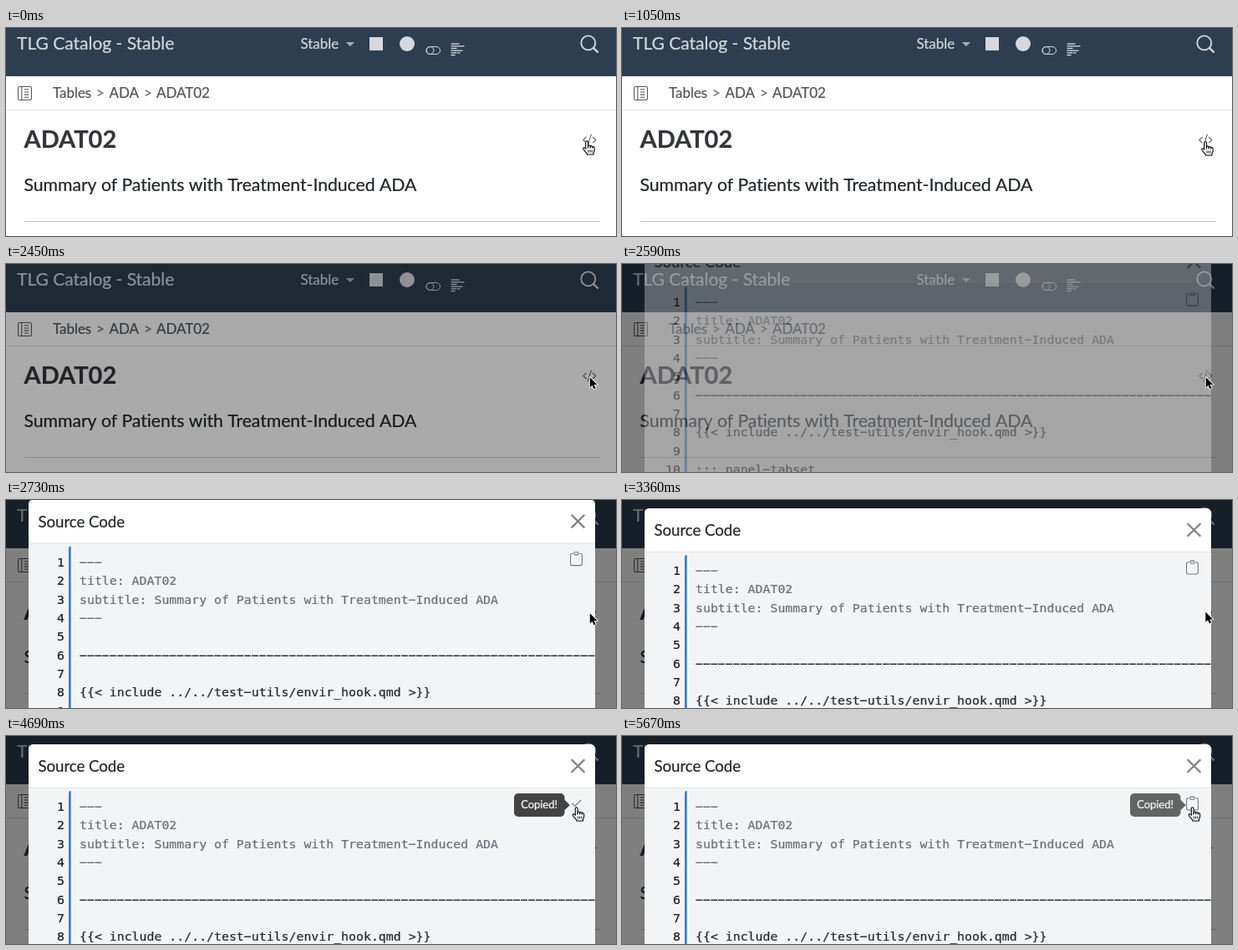
Recreate the animation shown at these times as an HTML page with a canvas. Size 730 by 250 pixels, loop 5740 ms.

```html
<!DOCTYPE html>
<html lang="en">
<head>
<meta charset="utf-8">
<title>Source code dialog</title>
<style>
  html, body { margin: 0; width: 100%; height: 100%; overflow: hidden; background: #fff; }
  canvas { display: block; width: 730px; height: 250px; }
</style>
</head>
<body>
<canvas id="stage"></canvas>
<script>
const W = 730, H = 250, LOOP = 5740, STEP = 70;
const SANS = 'Lato, sans-serif';
const MONO = '"DejaVu Sans Mono", monospace';
const NAV = '#d5d9dd';
const dpr = window.devicePixelRatio || 1;

function context(canvas) {
  canvas.width = W * dpr;
  canvas.height = H * dpr;
  return canvas.getContext('2d');
}

const stage = context(document.getElementById('stage'));
const layer = context(document.createElement('canvas'));
let ctx = stage;

const clamp = v => Math.max(0, Math.min(1, v));
const mix = (a, b, p) => a + (b - a) * p;
const ramp = (t, start, length) => clamp((t - start) / length);
const smooth = p => p * p * (3 - 2 * p);
const within = (t, a, b) => t >= a && t < b;

// CSS ease-out: cubic-bezier(0, 0, .58, 1)
function easeOut(p) {
  let lo = 0, hi = 1;
  for (let i = 0; i < 24; i++) {
    const u = (lo + hi) / 2;
    const x = 3 * (1 - u) * u * u * 0.58 + u * u * u;
    if (x < p) lo = u; else hi = u;
  }
  return 3 * (1 - lo) * lo * lo + lo * lo * lo;
}

// A hairline outline gives the slightly heavier look of smoothed type
function text(str, x, y, font, color, align = 'left') {
  ctx.font = font;
  ctx.letterSpacing = font.includes(SANS) ? '-0.05px' : '0px'; // also turns ligatures off
  ctx.textAlign = align;
  ctx.fillStyle = ctx.strokeStyle = color;
  ctx.lineWidth = 0.22;
  ctx.fillText(str, x, y);
  ctx.strokeText(str, x, y);
}

function box(x, y, w, h, color) {
  ctx.fillStyle = color;
  ctx.fillRect(x, y, w, h);
}

function disc(x, y, r, color) {
  ctx.fillStyle = color;
  ctx.beginPath();
  ctx.arc(x, y, r, 0, Math.PI * 2);
  ctx.fill();
}

function ring(x, y, r, color, width) {
  ctx.strokeStyle = color;
  ctx.lineWidth = width;
  ctx.beginPath();
  ctx.arc(x, y, r, 0, Math.PI * 2);
  ctx.stroke();
}

function stroke(d, color, width) {
  ctx.strokeStyle = color;
  ctx.lineWidth = width;
  ctx.stroke(new Path2D(d));
}

function roundRect(x, y, w, h, r) {
  ctx.beginPath();
  ctx.roundRect(x, y, w, h, r);
}

function at(x, y, scale, draw) {
  ctx.save();
  ctx.translate(x, y);
  ctx.scale(scale, scale);
  draw();
  ctx.restore();
}

// Icons below use a 16 unit grid
function sidebarIcon() {
  ctx.strokeStyle = '#555';
  ctx.lineWidth = 1;
  roundRect(0.5, 0.5, 15, 15, 1.5);
  ctx.stroke();
  stroke('M4.5 1V15M7.5 3.5H12.5M7.5 6.5H12.5M7.5 9.5H12.5M7.5 12.5H12.5', '#555', 1);
}

function codeIcon() {
  stroke('M4.5 4.5L1 8L4.5 11.5M11.5 4.5L15 8L11.5 11.5M10 1.5L6 14.5', '#5c5c5c', 1);
}

function clipboardIcon() {
  stroke('M4 2H3Q1.5 2 1.5 3.5V14Q1.5 15.5 3 15.5H13Q14.5 15.5 14.5 14V3.5Q14.5 2 13 2H12', '#6f7479', 1);
  roundRect(5.5, 0.5, 5, 3, 1);
  ctx.stroke();
}

function checkIcon() {
  stroke('M3 7.5L6.5 11L13.5 4', '#6f7479', 1.1);
}

function navbar() {
  box(0, 0, W, 58, '#2c3e50');
  text('TLG Catalog - Stable', 13, 26, `21.1px ${SANS}`, NAV);
  text('Stable', 352.5, 25, `17px ${SANS}`, NAV);
  ctx.fillStyle = '#a9b1b9';
  ctx.fill(new Path2D('M406.8 17H417L411.9 22Z'));

  box(435, 11, 16, 16, NAV);
  disc(480, 19, 9, NAV);

  ctx.strokeStyle = NAV;
  ctx.lineWidth = 1;
  roundRect(503, 22.5, 16.5, 9, 4.5);
  ctx.stroke();
  ring(507.5, 27, 4.4, NAV, 1);

  [10, 16, 7, 14, 11, 5].forEach((w, i) => box(532.5, 18.4 + i * 2.7, w, 1.3, NAV));
  box(541.5, 23.8, 1.2, 1.3, '#2c3e50');
  box(539, 29.2, 1.2, 1.3, '#2c3e50');

  ring(696.8, 17.9, 8.5, NAV, 1.9);
  stroke('M702.8 23.9L708.7 29.5', NAV, 2.4);
}

function page() {
  box(0, 0, W, H, '#fff');
  navbar();
  box(0, 98, W, 1, '#dee0e2');
  at(14, 70, 17 / 16, sidebarIcon);
  const crumb = (s, x, color = '#50565c') => text(s, x, 84, `17px ${SANS}`, color);
  crumb('Tables', 56);
  crumb('>', 108, '#70757a');
  crumb('ADA', 123.5);
  crumb('>', 165, '#70757a');
  crumb('ADAT02', 180);
  text('ADAT02', 21.5, 144, `700 29.1px ${SANS}`, '#343539');
  at(689.8, 126, 17 / 16, codeIcon);
  text('Summary of Patients with Treatment-Induced ADA', 21.5, 196, `21.25px ${SANS}`, '#212529');
  box(22, 232, 689, 1, '#c4c4c6');
}

const CODE = [
  '---',
  'title: ADAT02',
  'subtitle: Summary of Patients with Treatment-Induced ADA',
  '---',
  '',
  '-'.repeat(76),
  '',
  '{{< include ../../test-utils/envir_hook.qmd >}}',
  '',
  '::: panel-tabset'
];

function codeLines() {
  const font = `14.875px ${MONO}`;
  CODE.forEach((line, i) => {
    const y = Math.round(90 + i * 22.3125);
    text(String(i + 1), 70, y, font, '#16191c', 'right');
    // wide dashes, as in the code face
    text(line.replaceAll('-', '\u2212'), 88, y, font, i < 4 ? '#6a6f78' : '#24292e');
  });
}

function modal(copied) {
  ctx.save();
  roundRect(27, 10, 678, 340, 6);
  ctx.clip();
  box(27, 10, 678, 340, '#f3f4f6');
  box(27, 10, 678, 53, '#e3e5e8');
  box(27, 10, 678, 52, '#fff');
  text('Source Code', 38.5, 43, `18.7px ${SANS}`, '#24282c');
  stroke('M676.7 28.2L692.3 43.8M692.3 28.2L676.7 43.8', '#808080', 2.2);
  ctx.fillStyle = '#3a7fc4';
  ctx.fill(new Path2D('M75 353V69Q75 66 77.7 66V353Z'));
  codeLines();
  at(674, 72.6, 17 / 16, copied ? checkIcon : clipboardIcon);
  ctx.restore();
}

// Draws a group on its own layer, then blends it in as one picture
function blend(alpha, shift, draw) {
  ctx = layer;
  ctx.setTransform(dpr, 0, 0, dpr, 0, 0);
  ctx.clearRect(0, 0, W, H);
  ctx.translate(0, shift);
  draw();
  ctx = stage;
  ctx.globalAlpha = alpha;
  ctx.drawImage(layer.canvas, 0, 0, W, H);
  ctx.globalAlpha = 1;
}

function tooltip() {
  ctx.fillStyle = '#000';
  const shape = new Path2D();
  shape.roundRect(608, 69, 60.5, 28, 5);
  shape.addPath(new Path2D('M668 76.2L674.8 83L668 89.8Z'));
  ctx.fill(shape);
  text('Copied!', 616.2, 87.3, `13px ${SANS}`, '#fff');
}

const ARROW = new Path2D('M0 0V14.2L3.2 11.2L5.4 16.2L7.9 15.1L5.7 10.2H10.2Z');
const HAND = new Path2D('M-1.2 10V2.3Q-1.2 .8 .2 .8T1.6 2.3V7Q2 5.8 3.2 6T4.3 7.4Q4.9 6.4 5.9 6.7T6.9 8' +
  'Q7.6 7.3 8.4 7.7T9.2 9.5V11.5Q9.2 13 8 15V17H.3V15.8Q-1.5 14 -3.6 11.3Q-4.8 9.5 -4 8.9Q-3 8.3 -1.2 10Z');

function hand() {
  ctx.fillStyle = '#fff';
  ctx.fill(HAND);
  ctx.strokeStyle = '#000';
  ctx.lineWidth = 1.1;
  ctx.stroke(HAND);
  stroke('M1.6 7V9.5M4.3 7.4V9.6M6.9 8V9.8', '#000', 0.8);
  stroke('M2 11.5V14.5M4.1 11.5V14.5M6.2 11.5V14.5', '#000', 0.9);
}

function arrow() {
  ctx.lineJoin = 'round';
  ctx.strokeStyle = '#fff';
  ctx.lineWidth = 2;
  ctx.stroke(ARROW);
  ctx.fillStyle = '#000';
  ctx.fill(ARROW);
}

// Small hesitations before the first click: time, x, y
const DRIFT = [
  [0, 695, 135], [140, 695, 136], [210, 695.6, 137], [280, 696.2, 137.4],
  [420, 697.6, 137.4], [490, 699.4, 137.3], [560, 700.4, 137],
  [840, 699, 136.4], [1050, 698, 136]
];

function pointer(t) {
  if (t < 3360) return DRIFT.findLast(k => k[0] <= t).slice(1);
  if (t < 3990) {
    const p = smooth(ramp(t, 3290, 630));
    return [mix(698, 685, p), mix(136, 90, p)];
  }
  const p = ramp(t, 3920, 210);
  return [mix(685, 682.5, p), mix(90, 85, p)];
}

function draw(time) {
  const t = Math.floor(time / STEP) * STEP;
  ctx.setTransform(dpr, 0, 0, dpr, 0, 0);
  page();

  const dim = 0.5 * ramp(t, 2350, 150);
  if (dim) box(0, 0, W, H, `rgba(0,0,0,${dim})`);

  const fade = ramp(t, 2541, 150);
  const shift = -50 * (1 - easeOut(ramp(t, 2548, 300)));
  if (fade) blend(fade, shift, () => modal(within(t, 4570, 5618)));

  const tip = ramp(t, 4570, 150) - ramp(t, 5618, 150);
  if (tip > 0) blend(tip * 0.9, 0, tooltip);

  const [x, y] = pointer(t);
  if (within(t, 2450, 3850)) at(x + 0.8, y + 0.2, 0.86, arrow);
  else at(x, y, 1, hand);

  if (within(t, 2240, 2380)) ring(698, 136, 29.2, '#000', 2.6);
  if (within(t, 4340, 4550)) ring(682.5, 85, 29.2, '#000', 2.6);
}

const start = performance.now();
function tick() {
  draw((performance.now() - start) % LOOP);
  requestAnimationFrame(tick);
}
tick();
</script>
</body>
</html>
```
